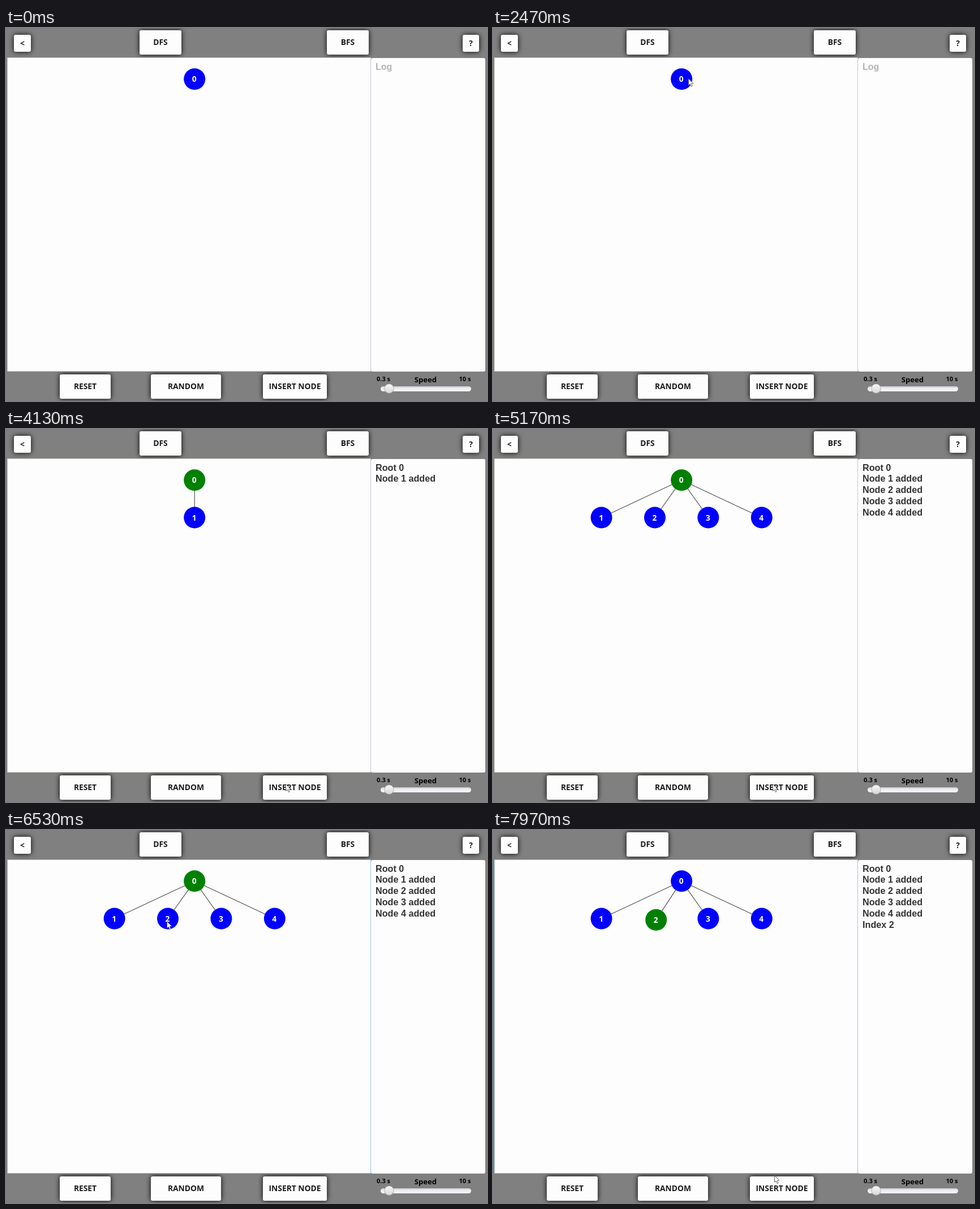
An HTML page with a canvas for the animation above (8 s loop, 850 px wide and 659 px high).

```html
<!DOCTYPE html>
<html lang="en">
<head>
<meta charset="utf-8">
<title>Graph search</title>
<style>
html, body { margin: 0; width: 100%; height: 100%; overflow: hidden; background: #808080; }
canvas { display: block; }
</style>
</head>
<body>
<canvas id="stage" width="850" height="659"></canvas>
<script>
const ctx = document.getElementById('stage').getContext('2d');
const LOOP = 8000;
const UI = '"Open Sans", "Noto Sans", sans-serif';
const LOG = '"Liberation Sans", Arial, sans-serif';
const BLUE = '#0000ff', GREEN = '#008000';
const ROOT = { x: 333.2, y: 90.3 };
const ROW_Y = 156.5, GAP = 94.4, RADIUS = 19;

const SELECT_ROOT = 2760;
const ADD = [3980, 4340, 4600, 4860];
const FOCUS_AGAIN = 6400, SELECT_TWO = 6800;
const DRAG = [7420, 7560];

// x, y, width, height, label, baseline
const BUTTONS = [
  [14, 12, 30, 30, '<', 31.5],
  [236, 4, 74, 43, 'DFS', 30],
  [567, 4, 74, 43, 'BFS', 30],
  [807, 12, 29, 30, '?', 32],
  [95, 612, 90, 43, 'RESET', 638],
  [256, 612, 124, 43, 'RANDOM', 638],
  [454, 612, 113, 43, 'INSERT NODE', 638]
];

// time, x, y of the pointer tip
const POINTER = [
  [1880, 292, -22], [2420, 345, 89], [3320, 345, 89], [3820, 494, 627],
  [5400, 494, 627], [6180, 284, 161], [DRAG[0], 284, 161],
  [DRAG[1], 286.5, 163], [7940, 497, 610]
];

const ease = p => p * p * (3 - 2 * p);
const progress = (t, a, b) => ease(Math.min(1, Math.max(0, (t - a) / (b - a))));

function label(str, x, y, size, color, align = 'center', family = UI) {
  ctx.font = `bold ${size}px ${family}`;
  ctx.textAlign = align;
  ctx.fillStyle = color;
  ctx.fillText(str, x, y);
}

function box(x, y, w, h, r, fill) {
  ctx.beginPath();
  ctx.roundRect(x, y, w, h, r);
  ctx.fillStyle = fill;
  ctx.fill();
}

function button([x, y, w, h, str, base]) {
  ctx.save();
  ctx.shadowColor = '#000';
  ctx.shadowBlur = 10;
  box(x, y, w, h, 3, '#fdfdfd');
  ctx.restore();
  label(str, x + w / 2, base, 13.8, '#1c1c1c');
}

function panes(focused) {
  box(2, 53, 643, 554, 0, '#fdfdfd');
  box(645, 53, 202, 554, 3, '#fdfdfd');
  ctx.strokeStyle = focused ? '#8fc4d2' : '#cbcbc0';
  ctx.lineWidth = 1;
  ctx.strokeRect(2.5, 52.5, 642, 554);
  ctx.fillStyle = focused ? '#a3c3e2' : '#c6c6dc';
  ctx.fillRect(644, 53, 1, 554);
}

function slider() {
  label('0.3 s', 667, 624, 11, '#000');
  label('Speed', 741.5, 626, 13.1, '#000');
  label('10 s', 811, 624, 11, '#000');
  const track = ctx.createLinearGradient(0, 633, 0, 642);
  track.addColorStop(0, '#c9c9cf');
  track.addColorStop(0.4, '#eeeef4');
  track.addColorStop(1, '#f4f4f6');
  box(662, 633, 160, 9, 4.5, track);
  const thumb = ctx.createLinearGradient(0, 629, 0, 646);
  thumb.addColorStop(0, '#f6f6f6');
  thumb.addColorStop(1, '#d6d6d6');
  disc(677, 637.3, 8.5, '#a4a4a4');
  disc(677, 637, 7.8, thumb);
}

function disc(x, y, r, fill) {
  ctx.beginPath();
  ctx.arc(x, y, r, 0, Math.PI * 2);
  ctx.fillStyle = fill;
  ctx.fill();
}

function node(p, name, color) {
  disc(p.x, p.y, RADIUS, color);
  label(name, p.x - 0.5, p.y + 5, 13.8, '#fff');
}

function tree(t) {
  const count = ADD.filter(a => t >= a).length;
  const drag = progress(t, ...DRAG);
  const kids = Array.from({ length: count }, (_, i) => {
    const shift = i === 1 ? drag * 2.2 : 0;
    return { x: ROOT.x + (i - (count - 1) / 2) * GAP + shift, y: ROW_Y + shift };
  });
  ctx.strokeStyle = '#505050';
  ctx.lineWidth = 1.2;
  for (const k of kids) {
    ctx.beginPath();
    ctx.moveTo(ROOT.x, ROOT.y);
    ctx.lineTo(k.x, k.y);
    ctx.stroke();
  }
  const chosen = t >= SELECT_TWO ? 2 : t >= SELECT_ROOT ? 0 : -1;
  [ROOT, ...kids].forEach((p, i) => node(p, String(i), i === chosen ? GREEN : BLUE));
}

function log(t) {
  if (t < SELECT_ROOT) {
    label('Log', 653, 73.5, 16, '#b4b4b4', 'left', LOG);
    return;
  }
  const lines = ['Root 0'];
  ADD.forEach((a, i) => { if (t >= a) lines.push(`Node ${i + 1} added`); });
  if (t >= SELECT_TWO) lines.push('Index 2');
  lines.forEach((s, i) => label(s, 653, 73.5 + i * 19.8, 16.2, '#333', 'left', LOG));
}

function pointer(t) {
  if (t < POINTER[0][0]) return;
  let i = 0;
  while (i < POINTER.length - 2 && t >= POINTER[i + 1][0]) i++;
  const [ta, xa, ya] = POINTER[i], [tb, xb, yb] = POINTER[i + 1];
  const p = progress(t, ta, tb);
  ctx.save();
  ctx.translate(xa + (xb - xa) * p + 0.5, ya + (yb - ya) * p + 0.5);
  ctx.beginPath();
  ctx.moveTo(0, 0);
  for (const [x, y] of [[0, 12], [2.7, 9.5], [4.7, 14], [6.7, 13.1], [4.8, 8.7], [8.4, 8.5]]) ctx.lineTo(x, y);
  ctx.closePath();
  ctx.fillStyle = '#fff';
  ctx.fill();
  ctx.strokeStyle = '#555';
  ctx.lineWidth = 0.9;
  ctx.stroke();
  ctx.restore();
}

function draw(t) {
  ctx.fillStyle = '#808080';
  ctx.fillRect(0, 0, 850, 659);
  BUTTONS.forEach(button);
  panes((t >= SELECT_ROOT && t < ADD[0]) || t >= FOCUS_AGAIN);
  slider();
  tree(t);
  log(t);
  pointer(t);
}

const start = performance.now();
function tick() {
  draw((performance.now() - start) % LOOP);
  requestAnimationFrame(tick);
}
tick();
</script>
</body>
</html>
```
